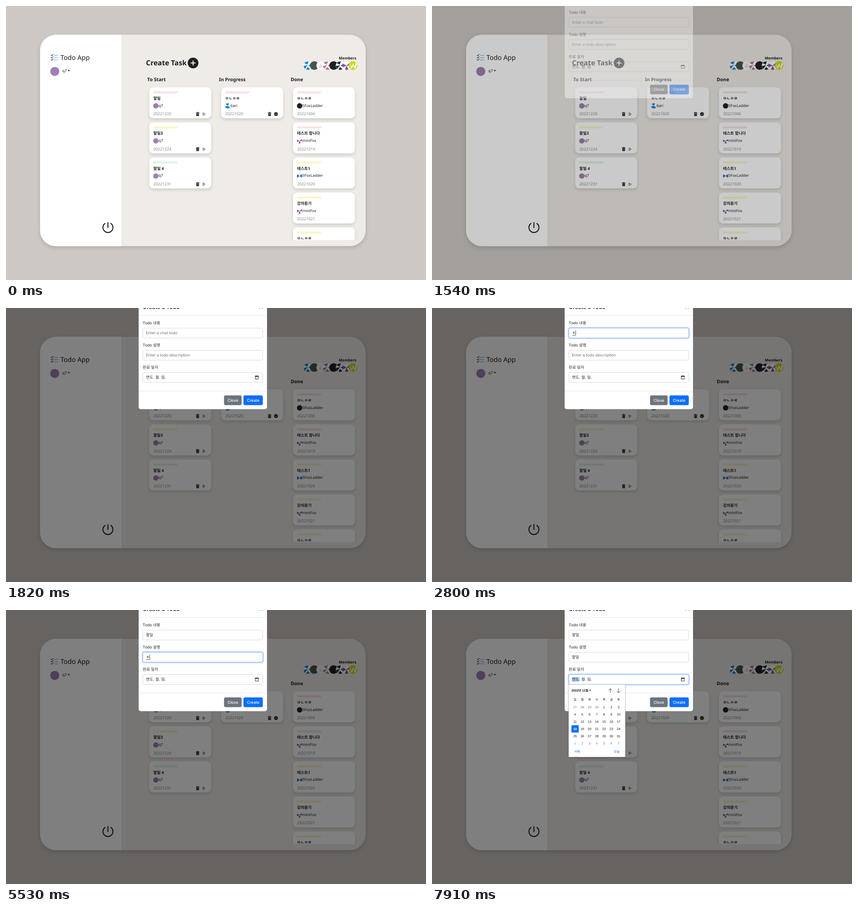
Animation, 925 px wide and 605 px high, one loop 8000 ms. Source, as an HTML page:

```html
<!DOCTYPE html>
<html lang="ko">
<head>
<meta charset="utf-8">
<title>Todo App</title>
<style>
  html, body { margin: 0; width: 100%; height: 100%; overflow: hidden; background: #cec8c4; }
  svg { display: block; width: 100%; height: 100%; }
  text { white-space: pre; text-rendering: geometricPrecision; }
  .board { font-family: "Noto Sans", "Noto Sans CJK KR", "Noto Sans CJK JP", sans-serif; fill: #1b1c1e; }
  .form { font-family: Inter, "Noto Sans CJK KR", "Noto Sans CJK JP", sans-serif; font-size: 8.6px; fill: #212529; }
  .cal { font-family: "Liberation Sans", "Noto Sans CJK KR", "Noto Sans CJK JP", sans-serif; font-size: 7.1px; fill: #111; }
</style>
</head>
<body>
<svg id="stage" viewBox="0 0 925 605" preserveAspectRatio="none"></svg>
<script>
const LOOP = 8000, TICK = 70;
const HAN = 0.92 * 8.6; // advance of one Hangul syllable in the form
const INK = '#1f2022';

// --- markup helpers ---
const text = (x, y, s, attrs = '') => `<text x="${x}" y="${y}" ${attrs}>${s}</text>`;
const rect = (x, y, w, h, fill, attrs = '') =>
  `<rect x="${x}" y="${y}" width="${w}" height="${h}" fill="${fill}" ${attrs}/>`;
const circle = (x, y, r, fill) => `<circle cx="${x}" cy="${y}" r="${r}" fill="${fill}"/>`;
const line = (d, color, w, attrs = '') =>
  `<path d="${d}" fill="none" stroke="${color}" stroke-width="${w}" ${attrs}/>`;
const size = (px, weight = 400) => `font-size="${px}" font-weight="${weight}"`;

// --- avatars, drawn in a unit circle ---
const SHAPES = {
  hourglass: 'M-1-.9L.6-1L0 0ZM0 0L1 .6L.4 1H-.8L-1 .2Z',
  bowtie: 'M0 0L-1-.85V.85ZM0 0L1-.85V.85Z',
  pinwheel: 'M0 0L-1-.55V.5ZM0 0L.95-.85V.1ZM0 0L.5 1H-.45Z',
  wedges: 'M-1-.7L.2-1L-.1-.2ZM-1 .1L0-.1L-.7 .8ZM.1 0L1-.5V.4ZM0 .3L.7 1H-.5Z',
  peak: 'M-.5 .5L0-.5L.5 .5Z',
  zigzag: 'M-.8-.6L-.3 .3L0-.5L.4 .3L.6-.7L.9-.3L.5 .8L.05 0L-.35 .8Z'
};
function avatar(x, y, r, base, color, shape) {
  const art = shape ? `<path d="${SHAPES[shape]}" fill="${color}" clip-path="url(#unit)"/>` : '';
  return `<g transform="translate(${x} ${y}) scale(${r})">${circle(0, 0, 1, base)}${art}</g>`;
}

const USERS = {
  me: ['q7', '#a07fb5'],
  blue: ['6ari', '#fff', '#1a84cc', 'hourglass'],
  dark: ['5FoxLadder', INK],
  bow: ['5FoxLadder', '#fff', '#2f6fc4', 'bowtie'],
  pin: ['miniFox', '#fff', '#8a559c', 'pinwheel']
};
const BARS = { pink: '#fde0e2', yellow: '#fbf6c6', green: '#dcf5e6' };

// --- board ---
const trash = (x, y) => `<g transform="translate(${x} ${y})">` +
  `<path d="M-3.8-3.8H-1.3V-4.6H1.3V-3.8H3.8V-2.7H-3.8ZM-3.2-2H3.2L2.8 4.2H-2.8Z" fill="${INK}"/>` +
  line('M-1.1-.8V3M1.1-.8V3', '#fff', 0.5) + '</g>';
const play = (x, y) => line(`M${x - 2.2} ${y - 3}L${x + 2.6} ${y}L${x - 2.2} ${y + 3}Z`, INK, 0.9, 'stroke-linejoin="round"');
const check = (x, y) => circle(x, y, 4.1, INK) +
  line(`M${x - 1.8} ${y}l1.4 1.5l2.4-2.8`, '#fff', 0.9);

function card(col, row, bar, title, user, date, action) {
  const x = [315.4, 473.8, 632][col], y = 179.5 + row * 77.4;
  const [name, ...look] = USERS[user];
  const icons = action ? trash(x + 106.7, y + 59.2) + action(x + 120.8, y + 59.2) : '';
  return rect(x, y, 136.5, 68.5, '#fff', 'rx="9" filter="url(#cardShadow)"') +
    rect(x + 9, y + 9, 53, 4.4, BARS[bar]) +
    text(x + 9, y + 27.2, title, size(8.7, 700)) +
    avatar(x + 14.6, y + 41, 5.9, ...look) +
    text(x + 20.6, y + 43, name, size(8.3)) +
    text(x + 9, y + 61.6, date, size(8.7, 500) + ' fill="#85868a"') + icons;
}

function board() {
  const members = [
    ['#fff', '#1a84cc', 'wedges'], ['#44554e'], ['#fbfaf8', '#e4dfd8', 'peak'],
    ['#fff', '#b3789c', 'wedges'], [INK], ['#fff', '#1d2f3c', 'wedges'],
    ['#fff', '#86579e', 'pinwheel'], ['#cbd915', '#fff', 'zigzag']
  ].map((look, i) => avatar(664.6 + i * 14.25, 131.5, 9.6, ...look)).join('');

  const ticks = [109, 114, 119].map(y =>
    line(`M106 ${y}H115`, '#8fbdf0', 1.5) +
    line(`M99 ${y - 0.8}l1.8 1.7l3.4-3.4`, '#2f3f6b', 1.3)).join('');

  return rect(0, 0, 925, 605, '#cec8c4') +
    rect(75, 63.5, 717, 466.8, '#efece7', 'rx="35" filter="url(#panelShadow)"') +
    `<path d="M254 63.5H110A35 35 0 0 0 75 98.5V495.3A35 35 0 0 0 110 530.3H254Z" fill="#fff"/>` +
    ticks + text(120, 119, 'Todo App', size(14.5)) +
    circle(107.4, 144.4, 10, '#a07fb5') + text(124, 146.3, 'q7', size(8.4)) +
    `<path d="M135.8 141.6h5l-2.5 2.8z" fill="${INK}"/>` +
    line('M218.6 479.8A11 11 0 1 0 230.4 479.8M224.5 477.5V490', INK, 2.2) +
    text(308.3, 131, 'Create Task', size(15.5, 600)) + circle(412, 125.8, 11.8, INK) +
    line('M406.6 125.8H417.4M412 120.4V131.2', '#fff', 1.9) +
    text(771.5, 117.8, 'Members', size(8.2, 700) + ' text-anchor="end"') + members +
    text(311, 165.8, 'To Start', size(10.6, 600)) +
    text(469, 165.8, 'In Progress', size(10.4, 600)) +
    text(627, 165.8, 'Done', size(10.5, 600)) +
    card(0, 0, 'pink', '할일', 'me', '20221220', play) +
    card(0, 1, 'yellow', '할일3', 'me', '20221224', play) +
    card(0, 2, 'green', '할일 4', 'me', '20221231', play) +
    card(1, 0, 'pink', 'ㅁㄴㅇㄹ', 'blue', '20221020', check) +
    '<g clip-path="url(#list)">' +
    card(2, 0, 'pink', 'ㅁㄴㅇㄹ', 'dark', '20221006') +
    card(2, 1, 'pink', '테스트 합니다', 'pin', '20221019') +
    card(2, 2, 'yellow', '테스트1', 'bow', '20221020') +
    card(2, 3, 'yellow', '강의듣기', 'pin', '20221021') +
    card(2, 4, 'yellow', 'ㅁㄴㅇㄹ', 'dark', '20221022') + '</g>';
}

// --- dialog ---
const FIELD_Y = [44.4, 93.4, 142.5];
const LABELS = ['Todo 내용', 'Todo 설명', '완료 일자'];
const HINTS = ['Enter a chat todo', 'Enter a todo description'];

function field(i) {
  const y = FIELD_Y[i], box = 'x="301.2" width="264.3" height="21.8" rx="3.2" y="' + y + '"';
  const hint = i < 2 ? text(308.2, y + 13.8, HINTS[i], `id="hint${i}" fill="#6c757d"`) : '';
  return text(301, y - 8.3, LABELS[i]) +
    `<rect id="glow${i}" ${box} fill="none" stroke="#0d6efd" stroke-opacity=".25" stroke-width="4.6"/>` +
    `<rect ${box} fill="#fff" stroke="#ced4da" stroke-width=".9"/>` +
    `<rect id="edge${i}" ${box} fill="none" stroke="#86b7fe" stroke-width=".9"/>` +
    (i === 2 ? rect(308, y + 5.9, 16.6, 10, '#b1d0fa', 'id="picked"') : '') + hint +
    text(308.2, y + 13.8, i === 2 ? '연도. 월. 일.' : '', `id="value${i}"`) +
    (i < 2 ? rect(0, y + 15.6, HAN - 0.6, 0.7, '#212529', `id="under${i}"`) +
      rect(0, y + 5.6, 0.8, 10.4, '#111', `id="caret${i}"`) : '');
}

const button = (x, w, color, label) => rect(x, 193, w, 21.5, color, 'rx="3.4"') +
  text(x + w / 2, 206.6, label, 'fill="#fff" font-weight="500" text-anchor="middle"');

function dialog() {
  return rect(292, -40, 283, 263.4, '#fff', 'rx="4.5" stroke="#000" stroke-opacity=".2" stroke-width=".6"') +
    text(301, 1.8, 'Create a Todo', size(12.1, 600)) +
    line('M558 -5L565.4 2.4M565.4 -5L558 2.4', '#777', 1.2, 'transform="translate(0 -1)"') +
    line('M292 16.5H575M292 183.4H575', '#dee2e6', 0.8) +
    field(0) + field(1) + field(2) +
    line('M549 150.4H555.8V157H549Z', '#111', 0.9) + rect(548.6, 149.6, 7.6, 2, '#111') +
    button(480.2, 38.7, '#6c757d', 'Close') + button(523, 42.6, '#0d6efd', 'Create');
}

// --- date picker: December 2022 ---
function calendar() {
  const mid = 'text-anchor="middle"', colX = c => 315.1 + c * 15.98;
  let out = rect(301, 164.5, 124.6, 160, '#fff', 'stroke="#bfbfbf" stroke-width=".6" filter="url(#popShadow)"') +
    text(307.2, 180.2, '2022년 12월', size(6.8, 700)) +
    `<path d="M346.2 176.2h4l-2 2.6z" fill="#111"/>` +
    line('M392.8 183V173.6M388.8 177.6l4-4l4 4M410.8 173.4V182.8M406.8 178.8l4 4l4-4', '#333', 0.9);
  [...'일월화수목금토'].forEach((d, c) => out += text(colX(c), 200.4, d, `${mid} font-size="6.7"`));
  for (let i = 0; i < 42; i++) {
    const date = new Date(2022, 10, 27 + i), day = date.getDate();
    const inside = date.getMonth() === 11, today = inside && day === 18;
    const x = colX(i % 7), y = 214.5 + Math.floor(i / 7) * 16;
    if (today) out += rect(x - 8, y - 8, 16, 16, '#0b6cff');
    const fill = today ? '#fff' : inside ? '#111' : '#757575';
    out += text(x, y + 2.6, day, `${mid} fill="${fill}" font-weight="${today ? 700 : 400}"`);
  }
  return out + text(319.8, 315.2, '삭제', `${mid} font-size="6.8" fill="#0b66d8"`) +
    text(406.8, 315.2, '오늘', `${mid} font-size="6.8" fill="#0b66d8"`);
}

const shadow = (id, dy, blur, alpha) =>
  `<filter id="${id}" x="-20%" y="-20%" width="140%" height="150%" color-interpolation-filters="sRGB">` +
  `<feDropShadow dx="0" dy="${dy}" stdDeviation="${blur}" flood-opacity="${alpha}"/></filter>`;

document.getElementById('stage').innerHTML =
  '<defs>' + shadow('cardShadow', 3, 3, 0.14) + shadow('panelShadow', 4, 4, 0.13) + shadow('popShadow', 1, 1.6, 0.25) +
  '<clipPath id="unit"><circle r="1"/></clipPath>' +
  '<clipPath id="list"><rect x="622" y="170" width="157" height="347"/></clipPath></defs>' +
  `<g class="board">${board()}</g>` + rect(0, 0, 925, 605, '#000', 'id="shade"') +
  `<g id="dialog" class="form">${dialog()}</g><g id="calendar" class="cal">${calendar()}</g>`;

// --- motion ---
const el = {};
document.querySelectorAll('#stage [id]').forEach(n => el[n.id] = n);
const clamp = v => Math.min(1, Math.max(0, v));
const smooth = v => v * v * (3 - 2 * v);
const set = (id, name, v) => el[id].setAttribute(name, v);

// cubic-bezier(0, 0, .58, 1)
function easeOut(x) {
  let lo = 0, hi = 1;
  for (let i = 0; i < 24; i++) {
    const s = (lo + hi) / 2;
    if (1.74 * s * s * (1 - s) + s ** 3 < x) lo = s; else hi = s;
  }
  return 3 * lo * lo * (1 - lo) + lo ** 3;
}

const OPEN = 1478, PICK = 7840;
const FOCUS = [2240, 4340, 6230, Infinity];
const TYPED = [
  [[2800, 'ㅎ'], [2870, '하'], [3080, '할'], [3150, '할ㅇ'], [3290, '할이'], [3710, '할일']],
  [[4620, 'ㅎ'], [4760, '하'], [5110, ''], [5530, 'ㅎ'], [5600, '하'], [5670, '할'],
   [5880, '할ㅇ'], [6020, '할이'], [6090, '할일']]
];
const fade = (t, start) => smooth(clamp((t - start + 40) / 150));
const typedAt = (keys, t) => keys.reduce((s, [at, v]) => t >= at ? v : s, '');

function draw(time) {
  const t = Math.floor(time / TICK) * TICK;
  const shown = clamp((t - OPEN) / 150);
  set('shade', 'opacity', shown * 0.5);
  set('dialog', 'opacity', shown);
  set('dialog', 'transform', `translate(0 ${-28.3 * (1 - easeOut(clamp((t - OPEN) / 300)))})`);

  for (let i = 0; i < 3; i++) {
    const on = t >= FOCUS[i] && t < FOCUS[i + 1];
    const glow = t < FOCUS[i] ? 0 : on ? fade(t, FOCUS[i]) : 1 - fade(t, FOCUS[i + 1]);
    set('glow' + i, 'opacity', glow);
    set('edge' + i, 'opacity', glow);
    if (i === 2) {
      set('picked', 'opacity', +on);
      continue;
    }
    const value = typedAt(TYPED[i], t), n = value.length;
    el['value' + i].textContent = value;
    set('hint' + i, 'opacity', n ? 0 : 1);
    set('caret' + i, 'opacity', +on);
    set('caret' + i, 'x', 308.2 + n * HAN);
    set('under' + i, 'opacity', on && n ? 1 : 0);
    set('under' + i, 'x', 308.6 + (n - 1) * HAN);
  }
  set('calendar', 'opacity', t >= PICK ? 1 : 0);
}

const start = performance.now();
function frame() {
  draw((performance.now() - start) % LOOP);
  requestAnimationFrame(frame);
}
frame();
</script>
</body>
</html>
```
